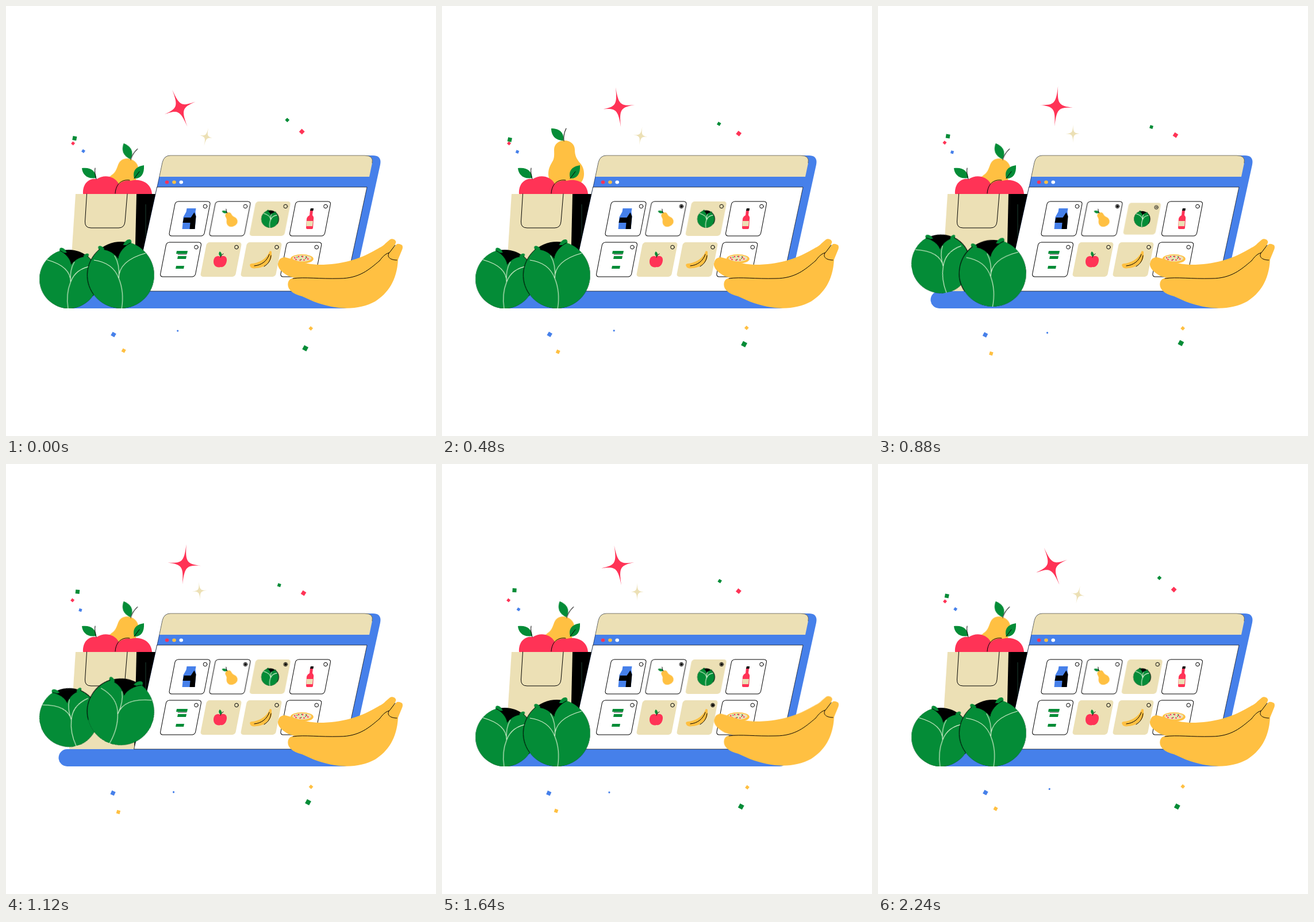
Recreate the animation shown at these times as an HTML page. Size 748 by 748 pixels, loop 2.28 s.

```html
<!DOCTYPE html>
<html lang="en">
<head>
<meta charset="utf-8">
<title>Grocery order</title>
<style>
  html, body { margin: 0; width: 100%; height: 100%; overflow: hidden; background: #fff; }
  svg { display: block; width: 100vw; height: 100vh; }
  .red { fill: #ff3356; } .yellow { fill: #ffc042; } .green { fill: #048c37; }
  .blue { fill: #4680ea; } .beige { fill: #ece0b5; } .white { fill: #fff; }
  .ink { fill: none; stroke: #000; stroke-width: 1; stroke-linecap: round; vector-effect: non-scaling-stroke; }
  .vein { fill: none; stroke: #e2f5d6; stroke-width: 1.1; vector-effect: non-scaling-stroke; }
  .outlined { fill: #fff; stroke: #000; stroke-width: 1; }

  .press, .dot, .pear, .cabbage, .banana { animation: 2280ms ease-in-out infinite; }
  .press { animation-name: press; }
  .dot { transform: scale(0); transform-origin: 27px -21.5px; }
  .dot1 { animation-name: dot1; }
  .dot2 { animation-name: dot2; }
  .dot3 { animation-name: dot3; }
  .second { animation-delay: 540ms; }
  .third { animation-delay: 1100ms; }
  .pear { transform: translate(200px, 320px) rotate(22deg); animation-name: pear; }
  .cabbage { animation-name: hop; }
  .cabbage.left { --hop: translateY(-47px) rotate(-22deg); }
  .cabbage.right { --hop: translateY(-37px) rotate(21deg); animation-delay: 100ms; }
  .banana { transform-origin: 575px 450px; animation-name: lift; }
  .banana.back { --lift: translate(3px, -22px) rotate(4deg); }
  .banana.front { --lift: translate(1px, -12px); }

  @keyframes press {
    0%, 8.5% { transform: none; }
    13.2% { transform: scale(.88); }
    17.6%, 100% { transform: none; }
  }
  @keyframes dot1 {
    0%, 13.6% { transform: scale(0); }
    16.7%, 95.2% { transform: none; }
    97.4%, 100% { transform: scale(0); }
  }
  @keyframes dot2 {
    0%, 37% { transform: scale(0); }
    40.4%, 95.2% { transform: none; }
    97.4%, 100% { transform: scale(0); }
  }
  @keyframes dot3 {
    0%, 61.8% { transform: scale(0); }
    65%, 95.2% { transform: none; }
    97.4%, 100% { transform: scale(0); }
  }
  @keyframes pear {
    0%, 12% { transform: translate(200px, 320px) rotate(22deg); }
    20.5%, 23% { transform: translate(216px, 290px) rotate(0deg); }
    34%, 100% { transform: translate(200px, 320px) rotate(22deg); }
  }
  @keyframes hop {
    0%, 31.6% { transform: none; }
    44.7% { transform: var(--hop); }
    57%, 100% { transform: none; }
  }
  @keyframes lift {
    0%, 69% { transform: none; }
    83% { transform: var(--lift); }
    96.5%, 100% { transform: none; }
  }
</style>
</head>
<body>
<svg viewBox="0 0 748 748">
  <defs>
    <rect id="card" x="-30.5" y="-30" width="61" height="60" rx="5" transform="skewX(-11)"/>
    <circle id="radio" class="ink" cx="27" cy="-21.5" r="3.3"/>
    <circle id="mark" cx="27" cy="-21.5" r="2.3"/>
    <g id="pear">
      <path class="yellow" d="M-3-56C8-56 15-49 15-40C15-30 18-24 24-17C30-10 31-4 31 2C31 18 18 28 0 28C-18 28-31 18-31 2C-31-8-27-14-23-21C-20-27-21-34-21-40C-21-49-14-56-3-56Z"/>
      <path class="green" d="M-5-56C-20-56-26-66-26-77C-12-77-3-70-5-56Z"/>
      <path class="ink" d="M-4-55C-5-64-3-71 0-77"/>
    </g>
    <g id="cabbage">
      <circle r="58"/>
      <path class="green" d="M-38-44C-43-52-34-53-29-46L-30-38ZM4-52C8-62 16-64 18-60C19-57 18-54 17-52Z"/>
      <path class="green" d="M17-56C38-50 58-28 58 0A58 58 0 0 1-58 0C-58-18-50-34-37-45C-23-44-14-40-5-29C-4-39 6-51 17-56Z"/>
      <path class="vein" d="M-47-26C-25-23-10-12-3.5 6C-4-18 18-31 43-38M-3.5 6C-2-10-4-22-11-34M-3.5 6C3 22 4 42 1.5 58"/>
      <path class="ink" d="M-5-29C-4-39 6-51 17-56M-37-45C-60-26-66 8-48 33"/>
    </g>
    <path id="star" d="M0-35C1-4 4-1 29 0C4 1 1 4 0 35C-1 4-4 1-29 0C-4-1-1-4 0-35Z"/>
  </defs>

  <!-- Bag and fruit -->
  <g class="pear"><use href="#pear"/></g>
  <path d="M226 327H264L240 430L222 496Z"/>
  <path d="M243 345V402" stroke="#24503f" stroke-width=".8"/>
  <path class="red" d="M134 327C133 306 147 299 158 301C171 292 189 296 196 309L199 327Z"/>
  <path class="green" d="M157 299C140 302 133 292 132 282C148 280 156 287 157 299Z"/>
  <path class="ink" d="M157 301C155 294 154 288 155 282"/>
  <path class="red" d="M190 327C191 308 204 302 217 304C236 299 253 309 254 327Z"/>
  <path class="ink" d="M190 326C191 308 203 301 215 303"/>
  <path class="green" d="M223 300C219 285 228 279 240 277C241 293 234 301 223 300Z"/>
  <path class="ink" d="M223 300L232 288"/>
  <path class="beige" d="M121 327H227L223 497H110Z"/>
  <path class="ink" d="M140.5 327L137.500 375Q137 386 148 386H196Q206 386 207 375L211 327"/>

  <!-- Screen and base -->
  <path class="blue" d="M286 260H638Q654 260 651 276L598 517Q596 526 588 526H106.500a15 15 0 0 1 0-30H223L272 272Q275 260 286 260Z"/>
  <path class="beige" d="M286 260H624Q640 260 637 273L632 297H266.500L272 272Q275 260 286 260Z"/>
  <path class="white" d="M263 315H628L589 496H223Z"/>
  <path class="ink" style="stroke-width:.5" d="M263 315L272 272Q275 260 286 260H624Q640 260 637 273"/>
  <path class="ink" style="stroke-width:.7" d="M263 315H628L589 496H223Z"/>
  <ellipse class="red" cx="280" cy="306.500" rx="3.300" ry="3"/>
  <ellipse class="yellow" cx="292.500" cy="306.500" rx="3.300" ry="3"/>
  <ellipse class="white" cx="304.700" cy="306.500" rx="3.300" ry="3"/>

  <!-- Product cards -->
  <g transform="translate(319.500 370)">
    <use href="#card" class="outlined"/><use href="#radio"/>
    <path class="blue" d="M-5-18H11L10-12L11-4L9 18H-13L-11-3L-6-12Z"/>
    <path d="M-10-2H2L8-11L11-4L9 18H0L1 7H-12Z"/>
  </g>
  <g transform="translate(389.500 370)"><g class="press">
    <use href="#card" class="outlined"/><use href="#radio"/>
    <use href="#mark" class="dot dot1"/>
    <use href="#pear" transform="translate(3.500 5) rotate(-25) scale(.31)"/>
  </g></g>
  <g transform="translate(459.300 370)"><g class="press second">
    <use href="#card" class="beige"/><use href="#radio"/>
    <use href="#mark" class="dot dot2"/>
    <use href="#cabbage" transform="translate(0 .5) scale(-.26 .26)"/>
  </g></g>
  <g transform="translate(529 370)">
    <use href="#card" class="outlined"/><use href="#radio"/>
    <path class="red" d="M0-15H5L4-6Q7-3 6 1L5 16Q5 18 3 18H-5Q-7 18-7 16L-6 0Q-5-4-1-6Z"/>
    <path d="M1-18H6L5.500-14H0Z"/>
    <path class="beige" d="M-6 4H5L4 13H-6.500Z"/>
  </g>
  <g transform="translate(304 441)">
    <use href="#card" class="outlined"/><use href="#radio"/>
    <path class="green" d="M-7-15H12L11-10H-8ZM-5-6H10L9-1H-6ZM-8 11H6L5 16H-9Z"/>
    <path class="ink" style="stroke-width:.8" d="M-5-9H10"/>
  </g>
  <g transform="translate(374 441)">
    <use href="#card" class="beige"/><use href="#radio"/>
    <path class="red" d="M-1-5C4-8 11-6 10 2C9 10 4 14-1 13C-7 15-13 11-13 4C-13-5-7-8-1-5Z"/>
    <path class="green" d="M-1-5C-5-9-4-12-2-14C2-11 2-8-1-5Z"/>
    <path class="ink" d="M-1-4Q0-8 4-10"/>
  </g>
  <g transform="translate(444 441)"><g class="press third">
    <use href="#card" class="beige"/><use href="#radio"/>
    <use href="#mark" class="dot dot3"/>
    <path class="yellow" d="M-19 12C-21 9-19 7-16 7C-4 6 6 0 12-9L15-15L18-14V-9C20 2 8 14-8 15C-14 16-18 15-19 12Z"/>
    <path class="ink" d="M-12 11C0 10 10 3 14-9M5 12C12 8 16 2 17-7"/>
  </g></g>
  <g transform="translate(513.300 441)">
    <use href="#card" class="outlined"/><use href="#radio"/>
    <ellipse class="yellow" cx="1.500" cy="-1" rx="20" ry="8"/>
    <ellipse class="beige" cx="1.500" cy="-2" rx="16.500" ry="5.500"/>
    <g fill="none" stroke-linecap="round">
      <path stroke="#ff3356" stroke-width="2.600" stroke-dasharray="0 7" d="M-11-3Q1-8 14-2Q4 3-9 0"/>
      <path stroke="#048c37" stroke-width="1.700" stroke-dasharray="0 8" d="M-7-4Q2-7 12-4Q6 0-4 0"/>
    </g>
  </g>

  <!-- Produce in front -->
  <g transform="translate(109.300 475)"><g class="cabbage left">
    <path fill="#dfe0a8" d="M-15-47C-17-55-11-56-8-50Z"/>
    <use href="#cabbage" transform="scale(-.88 .88)"/>
  </g></g>
  <g transform="translate(199.700 468)"><g class="cabbage right"><use href="#cabbage"/></g></g>
  <g class="banana back">
    <path class="yellow" d="M485 437C500 440 515 449 545 450C585 450 615 440 640 426C650 420 656 418 660 413L667 407C671 403 680 407 678 412L668 435C660 450 620 480 580 482C540 480 510 476 492 470C480 464 472 456 473 448Q475 437 485 437Z"/>
  </g>
  <g class="banana front">
    <path class="yellow" d="M497 474C520 471 545 475 580 474C615 474 632 458 650 443C655 436 660 431 667 429L679 415Q682 412 689 416Q691 419 689 424L682 441C680 478 664 500 642 514C612 530 575 529 535 514L515 505C495 500 488 490 491 480Q493 475 497 474Z"/>
    <path class="ink" d="M499 474C520 471 545 475 580 474C615 474 632 458 650 443C655 436 660 431 667 429L677 416M666 430C662 437 669 442 680 442"/>
  </g>

  <g id="sky"></g>
</svg>
<script>
  const LOOP = 2280;
  const sky = document.getElementById('sky');
  const floaters = [];

  // Swings by (dx, dy) and tilts by `sway` around `tilt`, furthest out at `phase` of the loop.
  function float(tag, color, attrs, x, y, dx, dy, phase, tilt = 30, sway = 10) {
    const el = document.createElementNS('http://www.w3.org/2000/svg', tag);
    el.setAttribute('class', color);
    for (const key in attrs) el.setAttribute(key, attrs[key]);
    sky.appendChild(el);
    floaters.push(now => {
      const swing = Math.cos((now / LOOP - phase) * 2 * Math.PI);
      el.setAttribute('transform',
        `translate(${x + dx * swing} ${y + dy * swing}) rotate(${tilt + sway * swing}) scale(${attrs.size || 1})`);
    });
  }

  const chip = (color, size, ...motion) =>
    float('rect', color, { x: -.5, y: -.5, width: 1, height: 1, size }, ...motion);
  const star = (color, size, ...motion) => float('use', color, { href: '#star', size }, ...motion);

  star('red', 1, 306.3, 176, -4.2, 1.7, .95, -8.5, -14.5);
  star('beige', .46, 342.5, 224, 6.2, 3.5, .05, 4.5, 9.5);
  chip('green', 7, 122, 226, -4.5, 7, .15, 8, 5);
  chip('red', 5, 116.1, 238, .6, 1.3, .1, 40, 2);
  chip('blue', 5, 132, 253.3, 3, -1, .91, 26);
  chip('green', 5.5, 482.3, 204.5, 7.3, -6.5, .95, 31, 14);
  chip('red', 7, 516.1, 221.6, -1.5, -3.2, .95, 38, 6);
  chip('blue', 7, 186.5, 572, .8, -.8, .15, 27, 4);
  chip('yellow', 6, 200, 602.5, 4.7, -3, .02, 22, 7);
  chip('yellow', 5.5, 530.4, 561.2, -.6, -1.3, .2, 41, 2);
  chip('green', 8, 523, 592, 4, -5.8, .35, 28, 0);
  float('circle', 'blue', { r: 1.6 }, 295, 568, 5, -4, .12);

  function draw() {
    const now = performance.now();
    floaters.forEach(move => move(now));
    requestAnimationFrame(draw);
  }
  draw();
</script>
</body>
</html>
```
